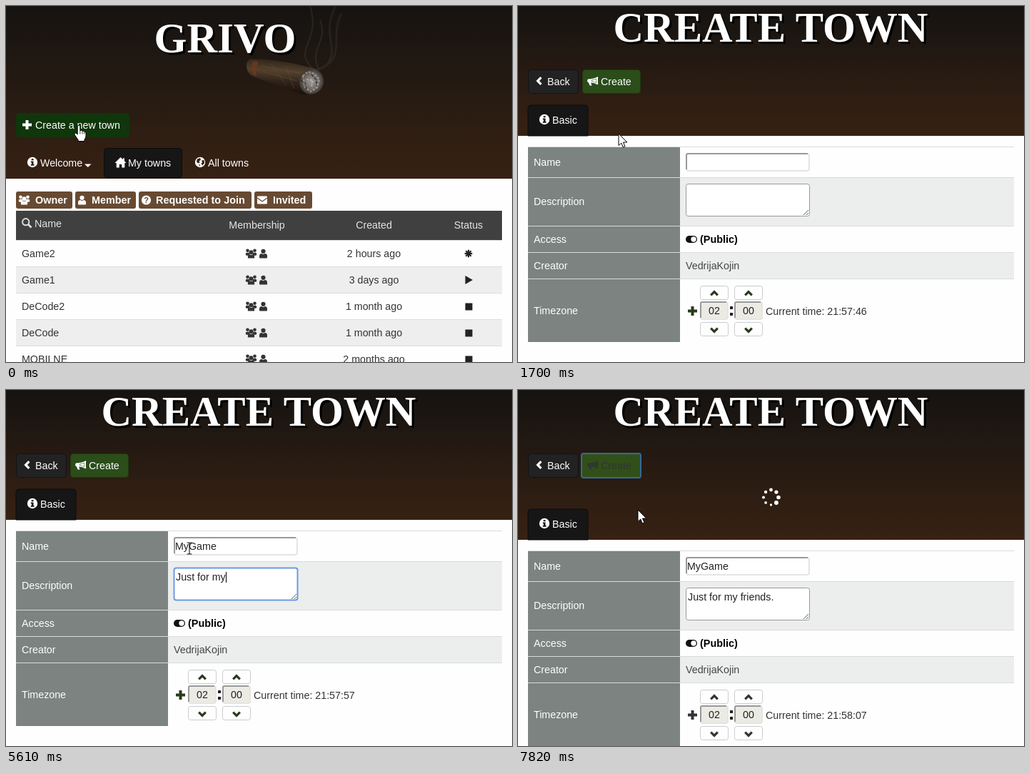
An HTML page for the animation above (7990 ms loop, 709 by 499 pixels).

```html
<!DOCTYPE html>
<html lang="en">
<head>
<meta charset="utf-8">
<title>Create a town</title>
<style>
  html, body { margin: 0; width: 100%; height: 100%; overflow: hidden; background: #fefefe; }
  svg { display: block; width: 709px; height: 499px; }
  text { font: 14.25px "Liberation Sans", Arial, sans-serif; white-space: pre; }
  .bold { font-weight: bold; font-size: 14.4px; }
  .title { font: bold 59px "Liberation Serif", "Times New Roman", serif; }
</style>
</head>
<body>
<svg id="stage" viewBox="0 0 709 499"></svg>
<script>
const LOOP = 7990, TICK = 170;
const stage = document.getElementById('stage');
const ruler = document.createElement('canvas').getContext('2d');
ruler.font = '14.25px "Liberation Sans", Arial, sans-serif';

// --- drawing helpers ---
const rect = (x, y, w, h, fill, extra = '') =>
  `<rect x="${x}" y="${y}" width="${w}" height="${h}" fill="${fill}" ${extra}/>`;
const box = (x, y, w, h, fill, stroke, r = 4, line = 1) =>
  rect(x + line / 2, y + line / 2, w - line, h - line, fill, `rx="${r}" stroke="${stroke}" stroke-width="${line}"`);
const path = (d, fill, extra = '') => `<path d="${d}" fill="${fill}" ${extra}/>`;
const line = (d, stroke, width, extra = '') =>
  path(d, 'none', `stroke="${stroke}" stroke-width="${width}" ${extra}`);
const circle = (x, y, r, fill, extra = '') =>
  `<circle cx="${x}" cy="${y}" r="${r}" fill="${fill}" ${extra}/>`;
const text = (x, y, str, fill = '#fff', extra = '') =>
  `<text x="${x}" y="${y}" fill="${fill}" ${extra}>${str}</text>`;
const centered = (x, y, str, fill, cls = '') =>
  text(x, y, str, fill, `text-anchor="middle" class="${cls}"`);
const bold = (x, y, str, fill) => text(x, y, str, fill, 'class="bold"');
const group = (x, y, content) => `<g transform="translate(${x} ${y})">${content}</g>`;
const title = (x, y, str) =>
  centered(x + 3, y + 2.5, str, '#000', 'title') + centered(x, y, str, '#fff', 'title');

// Last value whose start time has been reached.
const step = (t, keys) => keys.reduce((value, [at, next]) => t >= at ? next : value, keys[0][1]);

// --- icons, centred on x, y ---
const plus = (x, y, color) => line(`M${x - 6.5} ${y}h13M${x} ${y - 6.5}v13`, color, 4);
const info = (x, y, ink) => circle(x, y, 7.2, '#fff') +
  path(`M${x - 1.3} ${y - 5}h2.8v2.3h-2.8zM${x - 2.2} ${y - 1.5}h3.7v4.5h1v1.7h-4.7v-1.7h1v-2.8h-1z`, ink);
const user = (x, y, color) => group(x, y, circle(0, -3.2, 3.1, color) +
  path('M-5.5 6V3.5Q-5.5 .2-2.3 0 0 1.8 2.3 0 5.5 .2 5.5 3.5V6Q5 6.5 4 6.5H-4Q-5 6.5-5.5 6z', color));
const users = (x, y, color) => group(x, y,
  [-5, 5].map(dx => circle(dx, -4.2, 2.3, color) + rect(dx - 2.6, -1.2, 5.2, 4, color, 'rx="1.5"')).join('') +
  circle(0, -1.8, 3, color) + path('M-4.6 6.5V4Q-4.6 1.5-2 1.3 0 2.8 2 1.3 4.6 1.5 4.6 4V6.5z', color));
const question = (x, y, ink) => circle(x, y, 6.6, '#fff') +
  `<text x="${x}" y="${y + 4}" text-anchor="middle" fill="${ink}" style="font-size:11px;font-weight:bold">?</text>`;
const envelope = (x, y, ink) => rect(x - 7, y - 5.5, 14, 11, '#fff', 'rx="1.2"') +
  line(`M${x - 7} ${y - 3}l7 5 7-5`, ink, 1.2);
const home = (x, y) => path(`M${x - 8} ${y + .5}l8-8 3.3 3.2v-2h2v4l2.7 2.8h-2.2v6.5h-4v-4.5h-3.6v4.5h-4v-6.5z`, '#fff');
const globe = (x, y, ink) => circle(x, y, 7.2, '#fff') + group(x, y,
  path('M-4-4.5L0-6 1-3.5-1.5-1.5-.5.5-3 1.5-5-1zM2-2.5L5.5-3 6 1 3.5 4.5 1.5 2 3 0zM-2 3L0 3.5-.5 6z', ink));
const search = (x, y, color) =>
  circle(x - 1.3, y - 1.3, 4.6, 'none', `stroke="${color}" stroke-width="2"`) +
  line(`M${x + 2} ${y + 2}l4.5 4.5`, color, 2.6);
const horn = (x, y, color) => group(x, y,
  path('M7-6.5V5Q2 2-3 2L-1.5 6h-3L-6 2Q-8 1.5-8-.8-8-3-6-3.2H-3Q2-3.5 7-6.5z', color) +
  path('M4.8-3.4V2Q1.5 .5-1.5 .4V-1.9Q1.5-2 4.8-3.4z', 'none', 'stroke="#2b4d1a" stroke-width=".6"'));
const chevron = (x, y, angle, color) => line('M-4.8 2.4L0-2.4 4.8 2.4', color, 3.2,
  `transform="translate(${x} ${y}) rotate(${angle})"`);
const statusIcons = {
  star: y => [0, 45, 90, 135].map(a =>
    line('M-5.3 0H5.3', '#222', 2.2, `transform="translate(648 ${y}) rotate(${a})"`)).join(''),
  play: y => path(`M643.5 ${y - 6}l10.5 6-10.5 6z`, '#222'),
  stop: y => rect(643.5, y - 4.5, 10, 10, '#222')
};

function spinner(x, y, radius, dot, t) {
  let dots = '';
  for (let i = 0; i < 8; i++) {
    const phase = ((i + t / TICK) % 8) / 8, a = i * Math.PI / 4;
    dots += circle(x + radius * Math.cos(a), y + radius * Math.sin(a), dot * (.55 + .5 * phase), '#fff');
  }
  return dots;
}

const cursors = {
  hand: path('M-1.8 1.8Q-1.8 0 0 0 1.8 0 1.8 1.8V7.5Q4.3 6.5 5 8.3 7 7.5 7.8 9.3 10 8.8 10 11V15Q10 18 8 20V22.5H-1V20.5Q-3 18-5.8 13.5-6.5 11-4.3 11-3 11.5-1.8 13z',
    '#fff', 'stroke="#000"') + line('M1.8 7.5v5M5 8.5v4M7.8 9.5v3', '#000', .8),
  arrow: path('M0 0V16.5L3.8 13 6.3 19 9 17.8 6.5 12H11.8z', '#fff', 'stroke="#000"'),
  beam: line('M-3.5-8h2.5l1 1 1-1h2.5M0-7V7M-3.5 8h2.5l1-1 1 1h2.5', '#111', 1.1)
};
const cursorKeys = [
  [0, ['hand', 102, 167]], [340, ['hand', 134, 176]], [1700, ['arrow', 141, 179]],
  [2210, ['arrow', 170, 188]], [2380, ['arrow', 220, 206]], [2550, ['beam', 257, 222]],
  [6290, ['beam', 274, 228]], [6630, ['hand', 135, 104]], [7650, ['arrow', 150, 136]],
  [7820, ['arrow', 168, 168]]
];

const marker = d => line(d, '#a30d09', 7, 'stroke-linejoin="round" stroke-linecap="round"');
const focusedButton = (x, y, w, h, fill) => box(x, y, w, h, fill, '#35689c', 3, 2);
const header = h => `<defs><linearGradient id="dusk" x2="0" y2="1">
  <stop stop-color="#151311"/><stop offset=".9" stop-color="#342013"/><stop offset="1" stop-color="#362214"/>
  </linearGradient></defs>` + rect(0, 0, 709, 499, '#fefefe') + rect(0, 0, 709, h, 'url(#dusk)');

const cigar = `<defs>
  <linearGradient id="leaf" x1=".55" x2=".4" y2="1"><stop stop-color="#2a2018"/>
    <stop offset=".35" stop-color="#54412c"/><stop offset=".65" stop-color="#30221a"/>
    <stop offset="1" stop-color="#150d08"/></linearGradient>
  <radialGradient id="ash"><stop stop-color="#a09b96"/><stop offset=".6" stop-color="#6f6a66"/>
    <stop offset="1" stop-color="#3a3430"/></radialGradient></defs>` +
  line('M430 88C400 60 442 52 426 0M438 88C424 62 452 48 440 20', '#8a8580', 2, 'opacity=".14"') +
  line('M436 90C480 72 452 46 470 10M448 84C470 60 440 40 462 0', '#8a8580', 3, 'opacity=".1"') +
  path('M343 74Q336 77 337 85 338 95 347 99L412 123Q432 127 440 114 448 97 434 88L400 80Q370 74 343 74z', 'url(#leaf)') +
  line('M358 84L412 94M360 92L408 105M372 82L392 110M392 84L404 116', '#6b5740', 1, 'opacity=".45"') +
  path('M346 77l8 1q-5 10-3 20l-5-2q-4-10 0-19z', '#6a3a22', 'opacity=".8"') +
  '<ellipse cx="428" cy="106" rx="17" ry="18" fill="url(#ash)" transform="rotate(20 428 106)"/>' +
  line('M416 98l7-6 9 3 7 8-3 11-9 6-8-6zM421 103l9 1-2 9', '#d0ccc8', 2.2, 'opacity=".5" stroke-dasharray="3 2"') +
  line('M413 104l6 4 2 9M428 96l7 8 0 8', '#221d1a', 2, 'opacity=".6" stroke-dasharray="4 2"');

// --- first page: list of towns ---
const towns = [
  ['Game2', '2 hours ago', 'star'], ['Game1', '3 days ago', 'play'],
  ['DeCode2', '1 month ago', 'stop'], ['DeCode', '1 month ago', 'stop'],
  ['MOBILNE', '2 months ago', 'stop']
];

function townList(t) {
  const focused = t >= 340, brown = '#684a32';
  const badge = (x, w, label, labelX, icon) => rect(x, 260, w, 24, brown, 'rx="3"') + bold(labelX, 277, label) + icon;
  const rows = towns.map(([name, created, status], i) => {
    const y = 328 + 37 * i, mid = y + 19;
    return rect(14, y, 681, 37, i % 2 ? '#eee' : '#fefefe') + rect(14, y, 681, 1, '#ddd') +
      text(22, mid + 5, name, '#333') + users(343.5, mid, '#333') + user(360.5, mid, '#333') +
      centered(515.5, mid + 5, created, '#333') + statusIcons[status](mid);
  });
  return header(242) + rect(0, 241, 709, 1, '#2a180d') + cigar + title(307, 65, 'GRIVO') +
    (focused ? focusedButton(13, 149, 161, 36, '#0e390b') : box(14, 150, 159, 34, '#10360b', '#10360b')) +
    plus(29.5, 166.5, '#fff') + text(41, 172, 'Create a new town') +
    (t >= 1360 ? spinner(183, 166.5, 5.4, 1.8, t) : '') +
    info(37, 219, '#32200f') + text(48, 225, 'Welcome') + path('M110 221.5h9.5l-4.75 4.5z', '#fff') +
    box(137, 199, 110, 42, '#161616', '#0b0b0b') + home(160.5, 219.5) + text(171, 225, 'My towns') +
    globe(272, 219, '#32200f') + text(283, 225, 'All towns') +
    badge(14, 79, 'Owner', 41, users(25.5, 272, '#fff')) +
    badge(97, 85, 'Member', 120, user(106.5, 272, '#fff')) +
    badge(186, 158, 'Requested to Join', 210, question(196.5, 272, brown)) +
    badge(348, 81, 'Invited', 374, envelope(359, 272, brown)) +
    rect(14, 287, 681, 41, '#404040') + search(29, 304, '#ddd') + text(40, 310, 'Name', '#e4e4e4') +
    centered(351.5, 312, 'Membership', '#e4e4e4') + centered(515.5, 312, 'Created', '#e4e4e4') +
    centered(648, 312, 'Status', '#e4e4e4') + rows.join('') +
    (focused && t < 1190 ? marker('M7 125L230 124 226 206 5 209 10 126') : '');
}

// --- second page: form ---
const nameKeys = [[0, 0], [2720, 1], [2890, 2], [3060, 3], [3230, 4], [3570, 5], [3740, 6]];
const noteKeys = [[0, 0], [4250, 2], [4420, 4], [4760, 5], [4930, 6], [5100, 7], [5270, 8],
  [5610, 11], [5780, 13], [5950, 15], [6120, 17], [6290, 19], [6460, 20]];
const clockKeys = [[1700, 46], [4420, 55], [6460, 60], [7310, 65], [7820, 67]];

function clock(t) {
  const i = Math.max(1, clockKeys.findIndex(([at]) => t <= at));
  const [t0, s0] = clockKeys[i - 1], [t1, s1] = clockKeys[i];
  const s = Math.floor(s0 + (s1 - s0) * (t - t0) / (t1 - t0));
  return `21:${57 + Math.floor(s / 60)}:${String(s % 60).padStart(2, '0')}`;
}

const inset = (x, y, w, h, fill) => box(x, y, w, h, fill, '#e4e4e4', 3, 2) +
  line(`M${x + 1} ${y + h - 3}V${y + 3}q0-2 2-2H${x + w - 3}`, '#999', 2);
const typed = (x, y, str, caret) => text(x, y, str, '#222') +
  (caret ? rect(Math.round(x + ruler.measureText(str).width), y - 12, 1, 15, '#000') : '');
const focusRing = (x, y, w, h) => box(x - .5, y - .5, w + 1, h + 1, 'none', '#6c9ae6', 3, 2);

function form(t, ink) {
  const rows = [['Name', 197, 240], ['Description', 240, 308], ['Access', 308, 345], ['Creator', 345, 382], ['Timezone', 382, 471]];
  const inName = t >= 2550 && t < 4080, inNote = t >= 4080 && t < 6630;
  const spin = x => [[392, 0], [443, 180]].map(([y, a]) =>
    box(x, y, 40, 20, '#fefefe', '#ccc', 3) + chevron(x + 20, y + 11, a, ink)).join('');
  return rows.map(([label, y, end], i) =>
      rect(14, y, 213, end - y, '#7c8380') + rect(227, y, 468, end - y, i % 2 ? '#eceeed' : '#fefefe') +
      rect(14, y, 681, 1, '#d9dbda') + text(22, Math.round((y + end) / 2) + 5, label)).join('') +
    inset(235, 206, 174, 26, '#fff') + (inName ? focusRing(235, 206, 174, 26) : '') +
    typed(237, 224, 'MyGame'.slice(0, step(t, nameKeys)), inName) +
    box(235, 249, 174, 46, '#fff', '#999', 3) + (inNote ? focusRing(235, 249, 174, 46) : '') +
    typed(238, 267, 'Just for my friends.'.slice(0, step(t, noteKeys)), inNote && t < 6460) +
    line('M400 293l7-7M404 293l3-3', '#666', 1) +
    rect(235, 322, 16, 10, '#111', 'rx="5"') + circle(246, 327, 3.7, '#fff') + bold(255, 332, '(Public)', '#000') +
    text(235, 369, 'VedrijaKojin', '#444') +
    plus(244.5, 427.5, ink) + spin(255) + spin(303) +
    inset(255, 414, 40, 26, '#ebebe4') + inset(303, 414, 40, 26, '#ebebe4') +
    centered(275, 432, '02', '#222') + centered(323, 432, '00', '#222') +
    rect(297, 421, 4, 4, '#222') + rect(297, 430, 4, 4, '#222') +
    text(347, 433, `Current time: ${clock(t)}`, '#333');
}

function createTown(t) {
  const pressed = t >= 6630, sending = t >= 7650, shift = sending ? 28 : 0;
  const label = sending ? '#2f3534' : '#fff';
  const button = pressed
    ? focusedButton(88, 88, 85, 36, sending ? '#315019' : '#123a0d')
    : box(90, 89, 82, 34, '#2b4d1a', '#1d3a10');
  return header(182 + shift) + title(354, 50, 'CREATE TOWN') +
    box(14, 89, 71, 34, '#222', '#121212') + chevron(30, 105, -90, '#fff') + text(41, 111, 'Back') +
    button + horn(105, 105.5, label) + text(116, 111, 'Create', label) +
    (sending ? spinner(354.5, 150.5, 10.5, 3, t) : '') +
    group(0, shift,
      path('M14 182V143q0-4 4-4h76q4 0 4 4v39z', '#161616', 'stroke="#0b0b0b"') +
      info(37, 159, '#161616') + text(48, 165, 'Basic') +
      form(t, sending ? '#333' : '#2a3a1c')) +
    (pressed && t < 7480 ? marker('M66 73L218 74 214 146 64 147 68 74') : '');
}

// --- playback ---
let shown = -1;
function play() {
  const t = Math.floor(performance.now() % LOOP / TICK) * TICK;
  if (t !== shown) {
    const [shape, x, y] = step(t, cursorKeys);
    stage.innerHTML = (t < 1700 ? townList(t) : createTown(t)) + group(x, y, cursors[shape]);
    shown = t;
  }
  requestAnimationFrame(play);
}
play();
</script>
</body>
</html>
```
